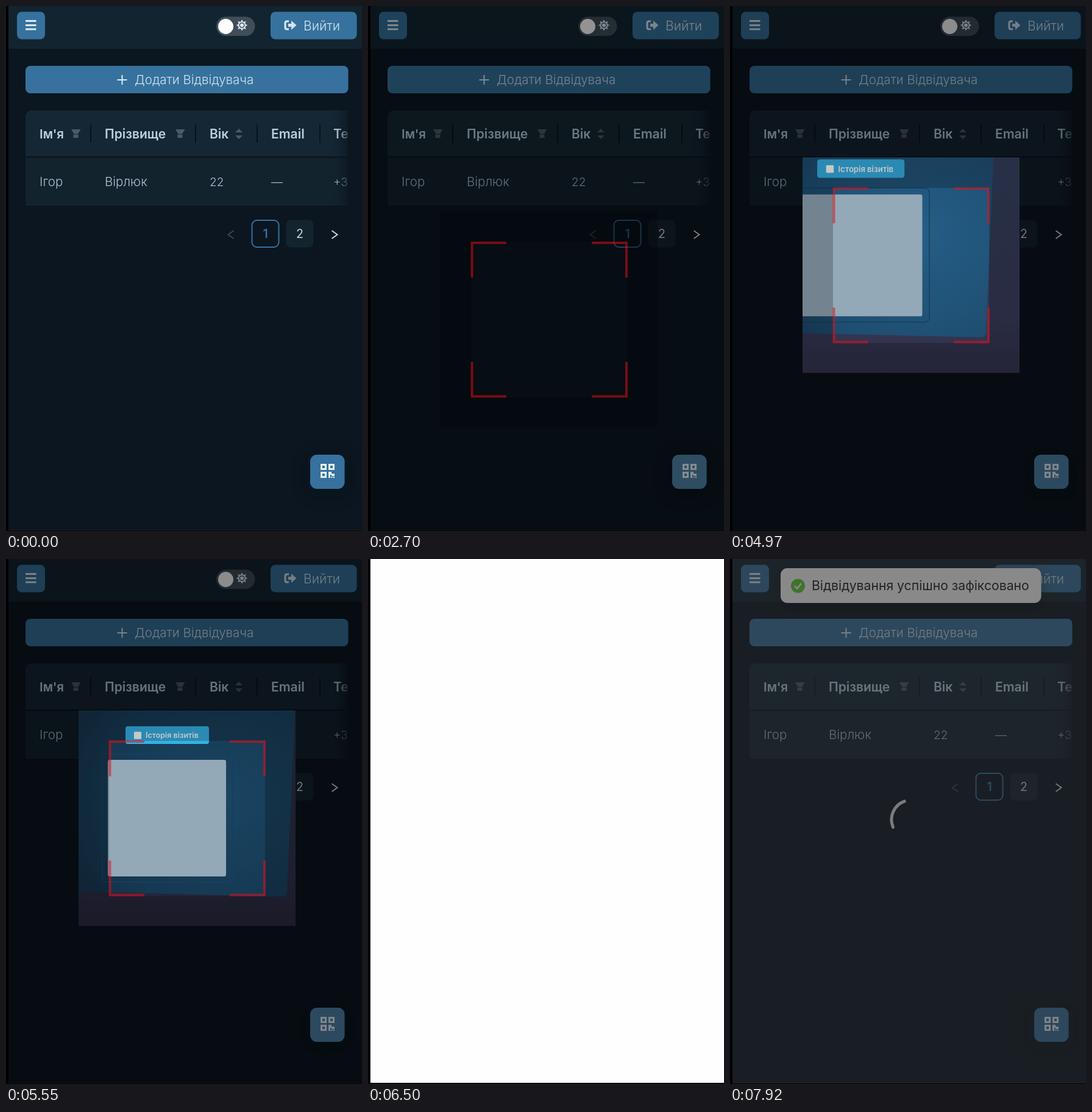
These frames come from a looping animation (584 px wide and 860 px high, 8 s). An HTML page:

```html
<!DOCTYPE html>
<html lang="uk">
<head>
<meta charset="utf-8">
<title>Відвідувачі</title>
<style>
html, body { margin: 0; width: 100%; height: 100%; overflow: hidden; background: #000; }
svg { display: block; width: 584px; height: 860px; font: 21px Inter, "Open Sans", sans-serif; }
.btn { fill: #36729d; }
.lt { fill: #d3e3ee; }
text.lt, .td { font-weight: 300; }
.th { font-weight: 600; fill: #b9d1e0; }
.td { font-size: 20.5px; fill: #a9c2d1; }
.mid { text-anchor: middle; }
.line { fill: none; stroke-width: 2; }
#alert text { font-size: 23px; text-anchor: middle; }
.bold { font-weight: 600; }
</style>
</head>
<body>
<svg viewBox="0 0 584 860">
  <defs>
    <clipPath id="tableClip"><path d="M32 327V183q0-12 12-12H561V327z"/></clipPath>
    <clipPath id="videoClip"><rect x="119" y="248" width="356" height="353"/></clipPath>
    <linearGradient id="edge"><stop offset="0" stop-color="#0b1620" stop-opacity="0"/><stop offset=".5" stop-color="#0b1620" stop-opacity=".15"/><stop offset="1" stop-color="#0b1620" stop-opacity=".75"/></linearGradient>
    <linearGradient id="room" x2="0" y2="1"><stop offset="0" stop-color="#34405e"/><stop offset=".75" stop-color="#363a58"/><stop offset="1" stop-color="#32304a"/></linearGradient>
    <radialGradient id="card" cx=".72" cy=".6" r=".75"><stop offset="0" stop-color="#26628b"/><stop offset=".6" stop-color="#1f5176"/><stop offset="1" stop-color="#1d3b57"/></radialGradient>
    <filter id="shadow" x="-60%" y="-60%" width="220%" height="220%"><feGaussianBlur stdDeviation="12"/></filter>
    <filter id="soft"><feGaussianBlur stdDeviation=".7"/></filter>
  </defs>

  <g id="page">
    <path fill="#0b1620" d="M4 0H584V858H4z"/>
    <path fill="#1d2329" d="M4 858H584v1H4z"/>
    <path fill="#122430" d="M4 0H584V70H4z"/>

    <rect class="btn" x="18" y="9.5" width="46" height="45" rx="8"/>
    <path class="line" style="stroke-width:3" stroke="#dcebf5" d="M32 24.5h17.500M32 31.500h17.500M32 38h17.500"/>

    <rect x="345" y="17.500" width="63.500" height="31.500" rx="15.700" fill="#3f4e59"/>
    <circle cx="360.500" cy="33.500" r="12.500" fill="#fff"/>
    <g class="line" stroke="#dcebf5" transform="translate(387 31.500)">
      <circle r="5.500"/><circle r="2" fill="#dcebf5"/>
      <path id="rays"/>
    </g>

    <rect class="btn" x="434" y="9.500" width="141.500" height="45" rx="8"/>
    <path class="line" style="stroke-width:3" stroke="#dcebf5" d="M464 25h-3q-3 0-3 3v7q0 3 3 3h3"/>
    <path class="lt" d="M463 29h5v-5l8.500 7.500-8.500 7.500v-5h-5z"/>
    <text class="lt" x="488" y="39.500">Вийти</text>

    <rect class="btn" x="32" y="98" width="529.500" height="45" rx="8"/>
    <path class="line" stroke="#dcebf5" d="M182.500 121h16M190.500 113v16"/>
    <text class="lt" x="211" y="128" style="font-size:20.500px">Додати Відвідувача</text>

    <g clip-path="url(#tableClip)">
      <path fill="#13232e" d="M32 171H561V327H32z"/>
      <path fill="#152734" d="M32 171H561V247H32z"/>
      <path class="line" stroke="#09121a" d="M32 247.500H561M139 194v30M311 194v30M412 194v30M515 194v30"/>
      <g class="th">
        <text x="55" y="217" style="font-size:20.500px">Ім'я</text><text x="162" y="217">Прізвище</text>
        <text x="334" y="217">Вік</text><text x="435" y="217">Email</text><text x="537" y="217">Телефон</text>
      </g>
      <path fill="#4a5b67" d="M107 202h15.500l-4.500 7.500h-6.500zM110.500 210.500h8v5.500h-8zM278 202h15.500l-4.500 7.500h-6.500zM281.500 210.500h8v5.500h-8zM376 207l6-6 6 6zM376 212l6 6 6-6z"/>
      <g class="td">
        <text x="55" y="295">Ігор</text><text x="162" y="295">Вірлюк</text>
        <text x="334" y="295" style="font-size:19px">22</text><text x="435" y="295" style="font-size:19px">—</text><text x="537" y="295" style="font-size:19px">+38</text>
      </g>
      <path fill="url(#edge)" d="M528 171H561V327H528z"/>
    </g>

    <path class="line" stroke="#3a4752" d="M373.500 368l-9 6.500 9 6.500"/>
    <path class="line" stroke="#cdd6dc" d="M534.500 368l9 6.500-9 6.500"/>
    <rect class="line" x="403.500" y="351" width="44" height="44" rx="8" stroke="#36729d"/>
    <rect x="459.500" y="350.500" width="45" height="45" rx="8" fill="#13242f"/>
    <text class="mid bold" x="425.500" y="380" style="font-size:19.500px" fill="#36729d">1</text>
    <text class="mid" x="482" y="380" style="font-size:19.500px" fill="#cdd6dc">2</text>

    <rect x="491" y="735" width="72" height="68" rx="16" fill="#05080c" opacity=".25" filter="url(#shadow)"/>
    <rect id="fab" x="499" y="735" width="56.500" height="56" rx="11"/>
    <path class="line" style="stroke-width:3" stroke="#e6f1f8" d="M517.500 751.500h7v7h-7zM530.500 751.500h7v7h-7zM517.500 764.500h7v7h-7z"/>
    <path fill="#e6f1f8" d="M529 763h5v3h5v4h-5v-2h-2v5h-3zM533.500 771h2v2h-2zM537 771h2v2h-2z"/>
  </g>

  <path id="mask" d="M4 0H584V860H4z"/>

  <g id="modal">
    <g id="video" clip-path="url(#videoClip)">
      <path fill="url(#room)" d="M119 248H475V601H119z"/>
      <g id="scene" filter="url(#soft)">
        <path fill="url(#card)" d="M40 150H480L474 248 461 545q-1 8-9 8L40 543z"/>
        <path id="exposure" d="M0 100H600V750H0z"/>
        <rect class="line" x="158" y="319" width="214" height="210" rx="7" stroke="#17405f" style="stroke-width:1.500"/>
        <rect x="167" y="329" width="194" height="191" rx="3" fill="#93a9b8"/>
        <rect x="196" y="274" width="137" height="29" rx="4" fill="#36b0e6"/>
        <rect x="210" y="283" width="12" height="12" rx="1.500" fill="#fff"/>
        <text x="229" y="293.500" fill="#fff" class="bold" style="font-size:12.500px">Історія візитів</text>
      </g>
    </g>
    <path fill="#000" fill-opacity=".22" fill-rule="evenodd" d="M119 248H475V601H119zM169 298V552H425V298z"/>
    <path class="line" style="stroke-width:4" stroke="#e41018" stroke-opacity=".55" d="M227 299H170.500V356M367 299H424V356M227 550.500H170.500V494M367 550.500H424V494"/>
  </g>

  <path id="dim" d="M4 0H584V860H4z"/>
  <g id="alert">
    <rect x="106" y="376" width="381.500" height="239" rx="18" fill="#262729"/>
    <path class="line" style="stroke-width:1" stroke="#4a4b4f" d="M106 553.500H487.500M297.500 553V615"/>
    <g class="bold" fill="#f2f2f5">
      <text x="297" y="426">«dorflincrmbe-</text>
      <text x="297" y="457">production.up.railway.app»</text>
      <text x="297" y="488">хоче отримати доступ до:</text>
      <text x="297" y="519">Камера</text>
    </g>
    <text class="bold" x="201.500" y="593" fill="#4484ee">Скасувати</text>
    <text x="392" y="593" fill="#4484ee">Дозволити</text>
  </g>

  <g id="toast">
    <rect x="84" y="20" width="426" height="54" rx="11" opacity=".4" filter="url(#shadow)"/>
    <rect x="83" y="15" width="427.500" height="57" rx="11" fill="#fff"/>
    <circle cx="111.500" cy="44" r="11.500" fill="#5fcf30"/>
    <path class="line" style="stroke-width:2.500" stroke="#fff" d="M106 44l4 4.500 7-8.500"/>
    <text x="134" y="51" style="font-size:21.200px" fill="#1f1f1f">Відвідування успішно зафіксовано</text>
  </g>
  <g id="loader">
    <path fill="#262628" fill-opacity=".54" d="M4 0H584V858H4z"/>
    <path id="arc" class="line" style="stroke-width:5" stroke="#7b7c80" stroke-linecap="round" d="M267.500 439.500A32 32 0 0 1 286 397"/>
  </g>
  <path id="blank" fill="#fefdff" d="M4 0H584V858H4z"/>
</svg>
<script>
const $ = id => document.getElementById(id);
const LOOP = 8000;
const clamp = (v, lo = 0, hi = 1) => Math.min(hi, Math.max(lo, v));
const ramp = (t, from, to) => clamp((t - from) / (to - from));
const easeOut = p => 1 - (1 - p) ** 3;
const mix = (a, b, p) => a + (b - a) * p;
const show = (id, on) => $(id).setAttribute('display', on ? 'inline' : 'none');
const opacity = (id, v) => $(id).setAttribute('opacity', v);
const move = (id, v) => $(id).setAttribute('transform', v);

$('rays').setAttribute('d', Array.from({ length: 8 }, (_, i) => {
  const c = Math.cos(i * Math.PI / 4), s = Math.sin(i * Math.PI / 4);
  return `M${6 * c} ${6 * s}L${8.5 * c} ${8.5 * s}`;
}).join(''));

function draw(t) {
  const scanning = t < 6500, reloaded = t >= 7320;

  // scanner window grows out of the floating button
  const open = scanning ? ramp(t, 2400, 2720) : 0;
  opacity('mask', 0.45 * open);
  const press = scanning ? ramp(t, 2310, 2500) : 0;
  $('fab').setAttribute('fill',
    `rgb(${mix(54, 80, press)},${mix(114, 134, press)},${mix(157, 172, press)})`);
  show('modal', open > 0);
  const size = mix(0.2, 1, easeOut(open)), drop = t < 3990 ? 89 : 0;
  move('modal', `translate(527 763) scale(${size}) translate(-527 ${drop - 763})`);
  opacity('modal', open);

  // permission prompt
  const ask = t < 3600 ? ramp(t, 3180, 3400) : 1 - ramp(t, 3710, 3890);
  const zoom = t < 3600 ? mix(1.12, 1, easeOut(ask)) : 1;
  opacity('dim', 0.42 * ask);
  opacity('alert', ask);
  move('alert', `translate(297 495) scale(${zoom}) translate(-297 -495)`);

  // hand-held camera drifting towards the code
  opacity('video', ramp(t, 4060, 4400));
  const k = clamp((t - 4970) / 580, -0.29, 1);
  const sway = t > 5550 ? Math.sin((t - 5550) / 280) * 3 : 0;
  move('scene', `translate(${mix(214, 264, k) + sway} ${mix(408, 424, k) - sway / 2}) scale(${mix(1.045, 1, k)}) translate(-264 -424)`);
  opacity('exposure', mix(0.04, 0.3, clamp(k)));

  // reload, spinner and success message
  show('blank', !scanning && !reloaded);
  show('loader', reloaded);
  move('arc', `rotate(${(t - 7920) * 0.36} 297 427)`);
  const arrive = easeOut(ramp(t, 7450, 7740));
  opacity('toast', arrive);
  move('toast', `translate(0 ${-56 * (1 - arrive)})`);
}

const start = performance.now();
function tick() {
  draw((performance.now() - start) % LOOP);
  requestAnimationFrame(tick);
}
tick();
</script>
</body>
</html>
```
